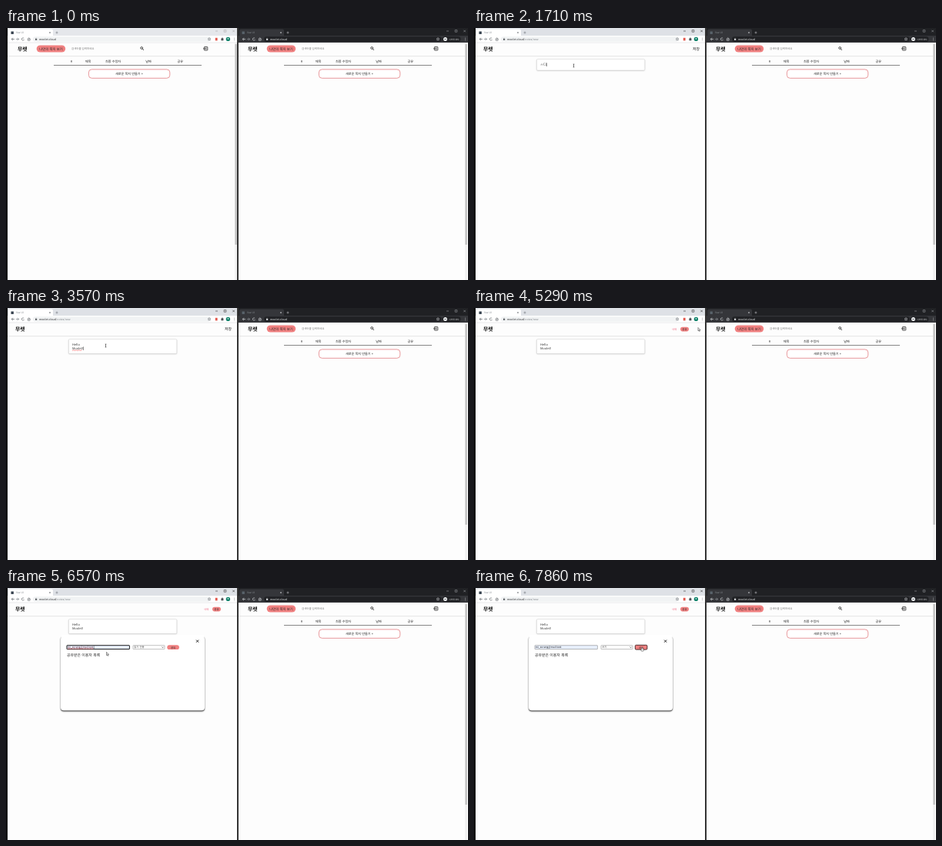
Animation of 600 by 328 pixels, one loop 8 s. Source, as an HTML page with a canvas:

```html
<!DOCTYPE html>
<html lang="ko">
<head>
<meta charset="utf-8">
<title>Shared notes</title>
<style>
html, body { margin: 0; width: 100%; height: 100%; overflow: hidden; background: #fff; }
canvas { display: block; width: 600px; height: 328px; }
</style>
</head>
<body>
<canvas id="stage"></canvas>
<script>
const W = 600, H = 328, LOOP = 8000, FPS = 7;
const FONT = '"Noto Sans CJK KR", "Noto Sans CJK", "Noto Sans", sans-serif';
const CORAL = '#f08080', INK = '#222';
const SITE = 'moolet.cloud', MAIL = 'mi_sorang@mail.test';

const canvas = document.getElementById('stage');
const dpr = window.devicePixelRatio || 1;
canvas.width = W * dpr;
canvas.height = H * dpr;
const c = canvas.getContext('2d');
c.textBaseline = 'middle';
if ('textRendering' in c) c.textRendering = 'geometricPrecision';

function rect(x, y, w, h, fill) {
  c.fillStyle = fill;
  c.fillRect(x, y, w, h);
}

function box(x, y, w, h, r, fill, stroke, lw = 0.6) {
  c.beginPath();
  c.roundRect(x, y, w, h, r);
  if (fill) { c.fillStyle = fill; c.fill(); }
  if (stroke) { c.strokeStyle = stroke; c.lineWidth = lw; c.stroke(); }
}

function line(pts, color, lw = 0.7) {
  c.beginPath();
  for (let i = 0; i < pts.length; i += 2) c.lineTo(pts[i], pts[i + 1]);
  c.strokeStyle = color;
  c.lineWidth = lw;
  c.stroke();
}

function ring(x, y, r, color, lw = 0.7, from = 0, to = 7) {
  c.beginPath();
  c.arc(x, y, r, from, to);
  c.strokeStyle = color;
  c.lineWidth = lw;
  c.stroke();
}

function dot(x, y, r, color) {
  c.beginPath();
  c.arc(x, y, r, 0, 7);
  c.fillStyle = color;
  c.fill();
}

function text(s, x, y, size, color = INK, align = 'left', weight = 400) {
  c.font = `${weight} ${size}px ${FONT}`;
  c.textAlign = align;
  c.fillStyle = color;
  c.fillText(s, x, y);
  return c.measureText(s).width;
}

function cross(x, y, r, color, lw) {
  line([x - r, y - r, x + r, y + r], color, lw);
  line([x - r, y + r, x + r, y - r], color, lw);
}

function raised(x, y, w, h, r, color, dy, blur) {
  c.save();
  c.shadowColor = color;
  c.shadowOffsetY = dy * dpr;
  c.shadowBlur = blur * dpr;
  box(x, y, w, h, r, '#fff');
  c.restore();
}

function squiggle(x, y, w) {
  const pts = [];
  for (let i = 0; i <= w; i += 0.7) pts.push(x + i, y + (pts.length % 4 ? 0.25 : -0.25));
  line(pts, '#e33', 0.5);
}

function chrome(x, theme, path) {
  rect(x, 0, 298, 10, theme.bar);
  box(x + 1, 1.5, 58, 10, [2, 2, 0, 0], theme.tool);
  rect(x, 10, 298, 9, theme.tool);
  rect(x + 4.5, 4.5, 3.4, 3.4, theme.mark);
  text('Vue UI', x + 11, 6.2, 3.3, theme.dim);
  cross(x + 55, 6, 1, theme.icon, 0.5);
  line([x + 62.5, 6, x + 65.5, 6], theme.icon, 0.5);
  line([x + 64, 4.5, x + 64, 7.5], theme.icon, 0.5);

  line([x + 270, 4, x + 273, 4], theme.win, 0.6);
  box(x + 281.2, 2.6, 2.6, 2.6, 0, null, theme.win, 0.6);
  cross(x + 293.6, 4, 1.3, theme.win, 0.6);

  line([x + 7, 12.7, x + 5.2, 14.5, x + 7, 16.3], theme.icon);
  line([x + 5.2, 14.5, x + 9, 14.5], theme.icon);
  line([x + 12.8, 12.7, x + 14.6, 14.5, x + 12.8, 16.3], theme.dim);
  line([x + 10.8, 14.5, x + 14.6, 14.5], theme.dim);
  ring(x + 20, 14.5, 1.6, theme.icon, 0.7, 0.4, 5.6);
  line([x + 25.8, 14.6, x + 27.8, 12.7, x + 29.8, 14.6], theme.icon);
  box(x + 26.5, 14.5, 2.6, 1.9, 0, null, theme.icon);

  box(x + 33, 11.2, 231, 6.6, 3.3, theme.field);
  rect(x + 36, 14, 2.2, 1.9, theme.icon);
  ring(x + 37.1, 13.9, 0.8, theme.icon, 0.4, Math.PI, Math.PI * 2);
  const w = text(SITE, x + 41, 14.6, 3.5, theme.url);
  text(path, x + 41 + w, 14.6, 3.5, theme.dim);

  for (const y of [13, 14.5, 16]) dot(x + 294.5, y, 0.4, theme.icon);
}

function star(x, y, color) {
  c.beginPath();
  for (let i = 0; i < 10; i++) {
    const a = i * Math.PI / 5 - Math.PI / 2, r = i % 2 ? 0.9 : 2;
    c.lineTo(x + r * Math.cos(a), y + r * Math.sin(a));
  }
  c.closePath();
  c.strokeStyle = color;
  c.lineWidth = 0.5;
  c.stroke();
}

function leftChrome(focused, path) {
  chrome(2, {
    bar: focused ? '#dee1e6' : '#e5e7eb', tool: '#fff', field: '#f1f3f4', mark: '#35404c',
    dim: '#80868b', icon: '#5f6368', win: focused ? '#333' : '#aaa', url: '#202124'
  }, path);
  star(264, 14.5, '#5f6368');
  rect(271.8, 12.8, 2.8, 3.6, '#e2574c');
  rect(279.4, 13.5, 3, 2.8, '#4a4f54');
  dot(281, 13.2, 0.8, '#4a4f54');
  dot(288.4, 14.4, 2.7, '#12836c');
  dot(288.4, 13.8, 0.9, '#d7efe9');
  rect(2, 18.7, 298, 0.6, '#d9dbde');
}

function rightChrome() {
  chrome(302, {
    bar: '#202124', tool: '#35363a', field: '#202124', mark: '#59636b',
    dim: '#8b9095', icon: '#d5d7da', win: '#9a9da1', url: '#f1f3f4'
  }, '');
  star(561, 14.5, '#d5d7da');
  box(566.5, 11, 24, 7, 3.5, '#202124');
  dot(570.5, 14.5, 2.5, '#f1f3f4');
  rect(569.1, 14.1, 2.8, 0.7, '#35363a');
  text('시크릿 모드', 575, 14.6, 2.8, '#f1f3f4');
}

function listPage(dx) {
  text('구름'.replace('구름', '무렛'), 15 + dx, 27, 6.9, '#111', 'left', 700);
  box(39.7 + dx, 22.4, 37.5, 9.2, 4.6, CORAL);
  text('나만의 쪽지 보기', 58.5 + dx, 27, 4.4, INK, 'center');
  text('검색어를 입력하세요', 85 + dx, 27, 3.45, '#777');
  ring(176.2 + dx, 26, 1.4, INK, 0.8);
  line([177.2 + dx, 27, 179 + dx, 28.8], INK, 0.9);
  box(257.4 + dx, 24.6, 4.4, 4.4, 0.4, null, INK, 0.8);
  line([256 + dx, 26.8, 260.2 + dx, 26.8], INK, 0.7);
  line([259 + dx, 25.6, 260.3 + dx, 26.8, 259 + dx, 28], INK, 0.6);
  rect(2 + (dx ? 300 : 0), 36.5, dx ? 294 : 295, 0.6, '#d4d4d4');

  const heads = [['#', 85], ['제목', 106.5], ['최종 수정자', 139], ['날짜', 185], ['공유', 226.3]];
  for (const [s, x] of heads) text(s, x + dx, 43.6, 4.15, INK, 'center');
  rect(62 + dx, 48.1, 192, 0.7, '#555');
  box(107.4 + dx, 53.9, 105.4, 11.4, 4, '#fff', '#e47f83', 0.8);
  text('새로운 쪽지 만들기 +', 160 + dx, 59.7, 4.1, INK, 'center');

  rect(297 + dx, 19, 3, 309, '#f1f1f1');
  rect(297.4 + dx, 21, 2.4, 261, '#c1c1c1');
}

// Note text by step: [first step, lines]
const TYPED = [
  [10, 'ㅗ'], [11, 'ㅗㄷ'], [12, 'ㅗ디'], [13, 'H'], [14, 'Hel'], [15, 'Hello\n'],
  [17, 'Hello\nM'], [18, 'Hello\nMo'], [19, 'Hello\nMoo'],
  [21, 'Hello\nMool'], [22, 'Hello\nMoole'], [23, 'Hello\nMoolet'], [24, 'Hello\nMoolet!']
];

function noteAt(step) {
  let s = '';
  for (const [from, value] of TYPED) if (step >= from) s = value;
  return s;
}

function editorPage(step) {
  const note = noteAt(step), lines = note.split('\n'), saved = step >= 29;
  text('무렛', 12, 27, 6.9, '#111', 'left', 700);
  rect(2, 36.5, 298, 0.6, '#d4d4d4');

  if (saved) {
    text('삭제', 257, 27.6, 3.4, '#f0617c');
    box(268, 24.8, 11, 5.6, 2.8, CORAL);
    text('공유', 273.5, 27.6, 3.5, INK, 'center');
  } else if (note) {
    text('저장', 284, 27.2, 4.9, '#111', 'left', 500);
  }

  const h = lines.length > 1 ? 19 : 14.4;
  raised(81.4, 40.6, 140.4, h, 1.5, 'rgba(0,0,0,.28)', 0.5, 1.6);
  box(81.4, 40.6, 140.4, h, 1.5, null, '#d5d5d5', 0.5);
  if (!note) text('글을 여기 적어주세요.', 86, 47.8, 4.1, '#b0b0b0');

  const size = lines.length > 1 || step > 12 ? 4 : 4.4;
  let w = 0;
  lines.forEach((s, i) => {
    w = text(s, 86, 47.7 + i * 5, size, '#333');
    if (i && s && !saved) squiggle(86, 55.1, w - (s.endsWith('!') ? 1 : 0));
  });
  if (step >= 9 && !saved) rect(86.3 + w, 45.4 + (lines.length - 1) * 5, 0.5, 4.6, '#222');
}

function dialog(step) {
  const filled = step >= 46, focused = step >= 43 && step < 49, active = step >= 55;
  raised(71, 63, 187, 96.6, 4, 'rgba(0,0,0,.9)', 0.8, 1.6);
  rect(72, 61, 185, 4, '#fff');
  cross(248.6, 69.2, 1.6, '#111', 0.9);

  box(79, 74.7, 81.4, 4.9, 0.4, filled ? '#e8f0fe' : '#fff', focused ? '#1c1c1c' : '#888', focused ? 1 : 0.6);
  if (filled) {
    const w = text(MAIL, 79.8, 77.2, 3.4, focused ? '#5a2430' : INK);
    if (focused) {
      squiggle(80, 79, w);
      rect(80.2 + w, 75.4, 0.4, 3.6, '#111');
    }
  } else if (focused) {
    rect(80.2, 75.4, 0.4, 3.6, '#111');
  } else {
    text('이메일', 79.8, 77.2, 3.4, '#999');
  }

  box(165, 74.7, 41, 4.9, 0.4, '#fff', '#999', 0.6);
  text(step >= 51 ? '쓰기' : '읽기 전용', 166.2, 77.2, 3.4, '#444');
  line([202.4, 76.6, 203.5, 77.7, 204.6, 76.6], '#333', 0.7);

  box(209.3, 74.3, 15.6, 5.8, active ? 1.2 : 2.9, CORAL, active ? '#3a2020' : null, 0.9);
  text('공유', 217.1, 77.2, 3.5, INK, 'center');
  text('공유받은 이용자 목록', 79, 87.3, 4.9, '#222');
}

// Pointer path: step, x, y
const PATH = [
  [1, 338, 84], [3, 160, 61], [4, 152.5, 72.5], [6, 131, 50], [7, 129.5, 49],
  [25, 129.5, 49], [26, 185, 42], [27, 265, 30], [28, 288, 26],
  [36, 289, 26], [37, 291, 25.5], [38, 281, 26], [39, 273, 27],
  [40, 240, 45], [42, 125, 77], [44, 125, 77], [46, 130.5, 83.5],
  [48, 182, 77], [49, 186, 77], [50, 176, 82], [52, 176, 82], [54, 216, 77], [55, 218, 77.5]
];

function pointer(step) {
  if (step < PATH[0][0]) return;
  let i = 0;
  while (i < PATH.length - 1 && PATH[i + 1][0] <= step) i++;
  const a = PATH[i], b = PATH[i + 1] || a;
  const k = b === a ? 0 : (step - a[0]) / (b[0] - a[0]);
  const x = a[1] + (b[1] - a[1]) * k, y = a[2] + (b[2] - a[2]) * k;

  const beam = (step >= 6 && step <= 25) || (step >= 42 && step <= 44);
  const hand = step === 3 || step === 28 || step === 39 || step >= 54;
  if (beam) {
    line([x, y - 2, x, y + 2], '#222', 0.6);
    line([x - 0.9, y - 2, x + 0.9, y - 2], '#222', 0.5);
    line([x - 0.9, y + 2, x + 0.9, y + 2], '#222', 0.5);
  } else if (hand) {
    box(x - 0.3, y, 1.1, 3, 0.5, '#fff', '#222', 0.5);
    box(x - 1, y + 1.8, 3.4, 2.8, 0.8, '#fff', '#222', 0.5);
    rect(x - 0.05, y + 0.5, 0.6, 2.4, '#fff');
  } else {
    c.beginPath();
    for (const [px, py] of [[0, 0], [0, 4.2], [1, 3.3], [1.7, 4.9], [2.4, 4.6], [1.7, 3.1], [3, 3]]) c.lineTo(x + px, y + py);
    c.closePath();
    c.fillStyle = '#fff';
    c.fill();
    c.strokeStyle = '#222';
    c.lineWidth = 0.5;
    c.stroke();
  }
}

function draw(step) {
  c.setTransform(dpr, 0, 0, dpr, 0, 0);
  rect(0, 0, W, H, '#fdfdfd');
  const editing = step >= 4;
  if (editing) editorPage(step); else listPage(0);
  listPage(299);
  leftChrome(step >= 1, editing ? '/notes/new' : '');
  rightChrome();
  if (step >= 40) dialog(step);
  if (step >= 3 && step <= 5) {
    box(2, 323.6, 99.5, 5, [0, 1, 0, 0], '#dee1e6', '#c4c7cb', 0.4);
    text(`https://${SITE}/notes/new`, 4, 326, 2.95, '#5f6368');
  }
  rect(0, 0, 2, H, '#000');
  rect(300, 0, 2, H, '#333');
  pointer(step);
}

function tick(now) {
  draw(Math.floor(((now % LOOP) + 5) * FPS / 1000) % (LOOP * FPS / 1000));
  requestAnimationFrame(tick);
}
draw(0);
requestAnimationFrame(tick);
</script>
</body>
</html>
```
